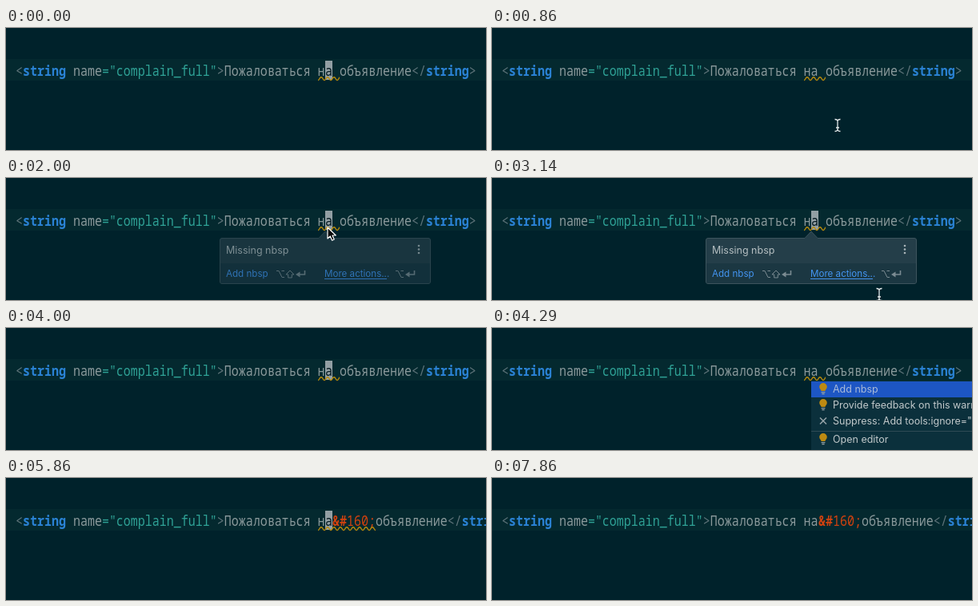
An HTML page that plays this animation: 600x153 px, repeating every 8.01 s.

```html
<!DOCTYPE html>
<html lang="ru">
<head>
<meta charset="utf-8">
<title>Missing nbsp</title>
<style>
  html, body { margin: 0; width: 100%; height: 100%; overflow: hidden; background: #00222b; }
  svg { display: block; width: 600px; height: 153px; }
  text { white-space: pre; }

  .code { font: 500 15px "Noto Sans Mono", "DejaVu Sans Mono", monospace; fill: #8b9a9c; }
  .punct { fill: #5f747a; }
  .tag { fill: #2a82d4; font-weight: 700; }
  .value { fill: #2fa296; }
  .entity { fill: #d2420f; }
  .entity .mark { font-weight: 700; }
  .under-caret { fill: #00161d; }

  .ui { font: 12.5px Inter, Roboto, sans-serif; fill: #b5bec1; }
  .menu { fill: #c0c8ca; }
  .picked { fill: #a9bad8; }
  .link { font-size: 11.6px; fill: #4394f0; }
  .key { fill: none; stroke: #7b8b92; }

  /* 56 equal ticks per loop */
  .anim { animation: 8010ms step-end -8ms infinite; }
  .caret { animation-name: caret; }
  .before { animation-name: before; }
  .after { animation-name: after; }
  .wave-after { animation-name: wave-after; }
  .popup { animation-name: popup; }
  .menu { animation-name: menu; }
  .mouse { animation-name: move; }
  .arrow { animation-name: arrow; }
  .beam { animation-name: beam; }

  @keyframes caret {
    0%, 12.5%, 25%, 37.5%, 50%, 69.64% { opacity: 1; }
    5.35%, 17.85%, 32.14%, 44.64%, 53.57%, 98.21%, 100% { opacity: 0; }
  }
  @keyframes before { 0% { opacity: 1; } 71.42%, 100% { opacity: 0; } }
  @keyframes after { 0% { opacity: 0; } 71.42%, 100% { opacity: 1; } }
  @keyframes wave-after { 0% { opacity: 0; } 71.42% { opacity: 1; } 87.5%, 100% { opacity: 0; } }
  @keyframes popup {
    0% { opacity: 0; }
    23.21% { opacity: .3; }
    25% { opacity: .7; }
    26.78% { opacity: .9; }
    28.57% { opacity: 1; }
    41.07%, 100% { opacity: 0; }
  }
  @keyframes menu { 0% { opacity: 0; } 53.57% { opacity: 1; } 69.64%, 100% { opacity: 0; } }
  @keyframes move {
    0% { transform: translate(500px, 200px); }
    5.35% { transform: translate(450px, 158px); animation-timing-function: steps(8, end); }
    19.64% { transform: translate(402px, 62px); }
    37.5% { transform: translate(436px, 100px); }
    39.28% { transform: translate(484px, 146px); }
    41.07%, 100% { transform: translate(500px, 200px); }
  }
  @keyframes arrow { 0% { opacity: 0; } 17.85% { opacity: 1; } 39.28%, 100% { opacity: 0; } }
  @keyframes beam { 0%, 39.28% { opacity: 1; } 17.85% { opacity: 0; } 100% { opacity: 1; } }
</style>
</head>
<body>
<svg viewBox="0 0 600 153" xmlns="http://www.w3.org/2000/svg">
  <defs>
    <pattern id="wave" x="390" y="61" width="8" height="6" patternUnits="userSpaceOnUse">
      <path d="M-2 2.5Q0 6.5 2 2.5T6 2.5T10 2.5" fill="none" stroke="#b88a0a" stroke-width="1.4"/>
    </pattern>
    <g id="option"><path d="M0 .5h3l4 8h3M6.5 .5h3.5"/></g>
    <g id="shift"><path d="M5 0L10 5H7.3V9H2.7V5H0Z"/></g>
    <g id="enter">
      <path d="M11.5 0V5H5" stroke-width="1.6"/>
      <path d="M0 5L5.5 1.5V8.5Z" fill="#7b8b92" stroke="none"/>
    </g>
    <g id="bulb">
      <path d="M-2.4 3C-2.4 1.5-4.8.6-4.8-2.2A4.8 4.8 0 0 1 4.8-2.2C4.8.6 2.4 1.5 2.4 3Z" fill="#bd8a12"/>
      <path d="M-2.4 4.6H2.4M-1.6 6.6H1.6" stroke="#98a3a5" stroke-width="1.2"/>
    </g>
  </defs>

  <rect width="600" height="153" fill="#00222b"/>
  <rect y="39" width="600" height="27" fill="#04292f"/>

  <g class="code">
    <text transform="translate(12 60) scale(1 1.2)"><tspan class="punct">&lt;</tspan><tspan class="tag">string</tspan> name<tspan class="value">="complain_full"</tspan><tspan class="punct">&gt;</tspan>Пожаловаться на</text>
    <g class="anim before">
      <text transform="translate(417 60) scale(1 1.2)">объявление<tspan class="punct">&lt;/</tspan><tspan class="tag">string</tspan><tspan class="punct">&gt;</tspan></text>
    </g>
    <g class="anim after">
      <text transform="translate(408 60) scale(1 1.2)"><tspan class="entity"><tspan class="mark">&amp;#</tspan>160;</tspan>объявление<tspan class="punct">&lt;/</tspan><tspan class="tag">string</tspan><tspan class="punct">&gt;</tspan></text>
    </g>
    <g class="anim caret">
      <rect x="399" y="41" width="9" height="24" fill="#929fa4"/>
      <text class="under-caret" transform="translate(399 60) scale(1 1.2)">а</text>
    </g>
  </g>

  <rect class="anim before" x="390" y="61" width="27" height="6" fill="url(#wave)"/>
  <rect class="anim wave-after" x="390" y="61" width="72" height="6" fill="url(#wave)"/>

  <g class="anim popup ui">
    <path d="M270 75.5H391L399 67L407 75.5H528Q530.5 75.5 530.5 78V130Q530.5 132.5 528 132.5H270Q267.5 132.5 267.5 130V78Q267.5 75.5 270 75.5Z" fill="#243e49" stroke="#3d545d"/>
    <path d="M268 107H530V130Q530 132 528 132H270Q268 132 268 130Z" fill="#1b3742"/>
    <text x="275" y="95">Missing nbsp</text>
    <g fill="#aab5b9">
      <circle cx="516" cy="85" r="1.3"/>
      <circle cx="516" cy="89.5" r="1.3"/>
      <circle cx="516" cy="94" r="1.3"/>
    </g>
    <text class="link" x="275" y="124">Add nbsp</text>
    <text class="link" x="398" y="124">More actions...</text>
    <path d="M398 126.5H476" stroke="#4394f0"/>
    <g class="key">
      <use href="#option" x="338" y="116"/>
      <use href="#shift" x="350" y="116"/>
      <use href="#enter" x="362" y="116"/>
      <use href="#option" x="487" y="116"/>
      <use href="#enter" x="499" y="116"/>
    </g>
  </g>

  <g class="anim menu ui">
    <rect x="399" y="66" width="201" height="87" fill="#0b303c"/>
    <rect x="399" y="67" width="201" height="20" fill="#1d56c4"/>
    <path d="M399 129.5H600" stroke="#2f4b55"/>
    <use href="#bulb" x="414" y="76"/>
    <use href="#bulb" x="414" y="96"/>
    <use href="#bulb" x="414" y="139"/>
    <path d="M410 112.5l8 8m0-8l-8 8" stroke="#98a5a9" stroke-width="1.5"/>
    <text class="picked" x="426" y="81">Add nbsp</text>
    <text x="426" y="101">Provide feedback on this warning</text>
    <text x="426" y="121">Suppress: Add tools:ignore="MissingNbsp" attribute</text>
    <text x="426" y="144">Open editor</text>
  </g>

  <g class="anim mouse">
    <path class="anim arrow" d="M0 0V14L3.3 11L5.6 16.2L8.2 15L6 10H10.3Z" fill="#050505" stroke="#fff" stroke-width="1.2" stroke-linejoin="round"/>
    <path class="anim beam" d="M-3.5-7.5Q0-7.5 0-5V5Q0 7.5-3.5 7.5M3.5-7.5Q0-7.5 0-5M0 5Q0 7.5 3.5 7.5M-2 3H2" fill="none" stroke="#e4e9ea" stroke-width="1.3"/>
  </g>
</svg>
</body>
</html>
```
